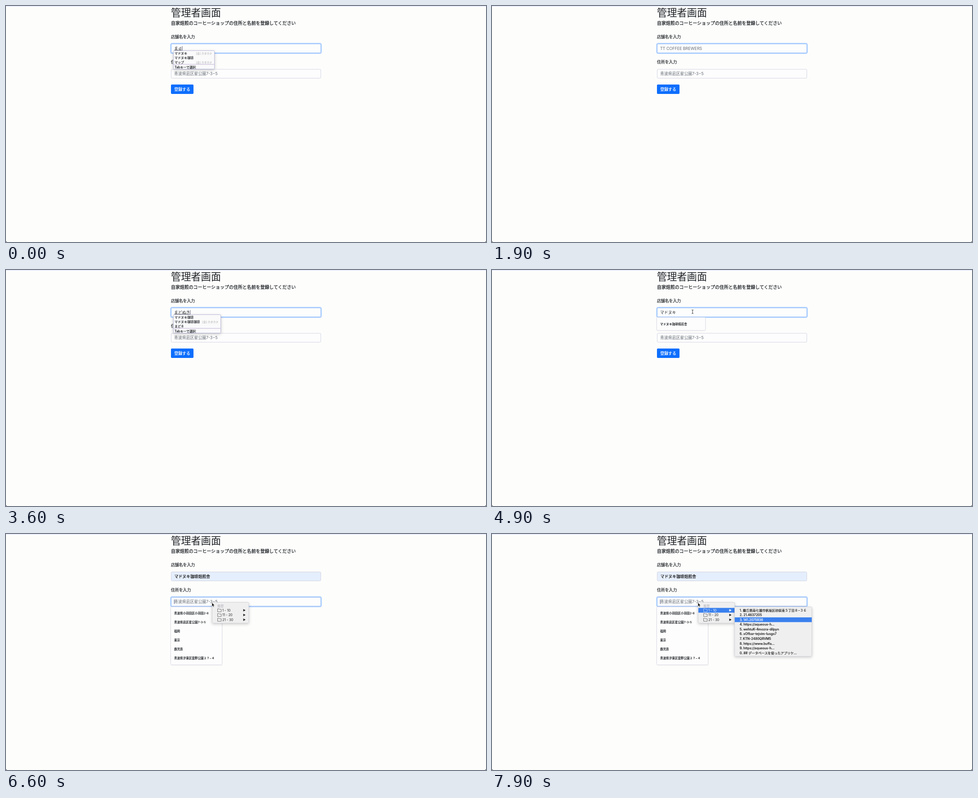
These frames come from a looping animation (1065x526 px, 8 s). An HTML page:

```html
<!DOCTYPE html>
<html lang="ja">
<head>
<meta charset="utf-8">
<title>管理者画面</title>
<style>
  html, body { margin: 0; width: 100%; height: 100%; overflow: hidden; background: #fdfdfc; }
  svg { display: block; width: 100vw; height: 100vh; }
  text { font-family: Inter, "Noto Sans CJK JP", "Noto Sans CJK", sans-serif; white-space: pre; }
  .soft { filter: drop-shadow(0 1px 1px #0001); }
  .deep { filter: drop-shadow(0 2px 3px #0003); }
</style>
</head>
<body>
<svg id="stage" viewBox="0 0 1065 526"></svg>
<script>
const LOOP = 8000, INK = '#212529', MUTED = '#626a73', BLUE = '#0d6efd', PICK = '#3a80ee';
const SHOP = 'マドヌキ', SHOP_FULL = SHOP + '珈琲焙煎舎';
const ADDRESS = '青波県凪区星公園7-3−5';

// Kana shown while composing, with the time each step begins.
const TYPING = [
  [0, 'まｄ'], [700, 'ま'], [1000, ''],
  [2300, 'ｍ'], [2400, 'ま'], [2600, 'まｄ'], [2700, 'まど'], [2900, 'まどｎ'],
  [3000, 'まどぬ'], [3200, 'まどぬｋ'], [3300, 'まどぬき'], [3800, SHOP]
];
const COMMIT = 4200, POINTER = 4600, CHOOSE = 5300, CLICK = 5700, FOCUS = 6000, MENU = 6600;
const HOVERS = [[MENU, -1], [7000, 0], [7500, 1], [7800, 2]];
const POINTER_PATH = [[POINTER, 445, 93], [4950, 445, 93], [5200, 430, 120], [5350, 430, 120], [CLICK, 457, 154]];

const ADDRESS_HISTORY = ['青波県小羽田区小羽田2-6', '青波県凪区星公園7-3-5', '福岡', '東京', '鹿児島', '青波県汐東区雲野公園２７−４'];
const CLIPS = [
  '霧丘県南七瀬市帆坂区砂原東５丁目８−３６', '21.4637205', '141.2075936', 'https://aqueous-h...',
  'wehtuK-4mozra-dilpyn', 'xOfbar-tejvim-lusgo7', 'KTN-2480QRVM5', 'https://www.buffa...',
  'https://aqueous-h...', '## データベースを使ったアプリケ...'
];

const stepAt = (steps, t) => steps.filter(([start]) => start <= t).pop()[1];
const ramp = (t, start, length) => Math.max(0, Math.min(1, (t - start) / length));

function pointerAt(t) {
  const next = POINTER_PATH.findIndex(([time]) => time > t);
  if (next < 1) return POINTER_PATH.at(-1).slice(1);
  const [t0, x0, y0] = POINTER_PATH[next - 1], [t1, x1, y1] = POINTER_PATH[next];
  const k = ramp(t, t0, t1 - t0), ease = k * k * (3 - 2 * k);
  return [x0 + (x1 - x0) * ease, y0 + (y1 - y0) * ease];
}

// Text is placed by its left edge and vertical centre; medium weight gets a hairline outline.
function text(x, cy, size, content, fill = INK, weight = 400) {
  const outline = weight === 500 ? `stroke="${fill}" stroke-width="${size * .028}"` : '';
  return `<text x="${x}" y="${cy + size * .38}" font-size="${size}" font-weight="${weight}" fill="${fill}" ${outline}>${content}</text>`;
}
const rect = (x, y, w, h, fill, extra = '') =>
  `<rect x="${x}" y="${y}" width="${w}" height="${h}" fill="${fill}" ${extra}/>`;
const path = (d, stroke, width = 1, fill = 'none') =>
  `<path d="${d}" stroke="${stroke}" stroke-width="${width}" fill="${fill}"/>`;
const panel = (x, y, w, h, fill, stroke, shadow = 'deep') =>
  rect(x + .5, y + .5, w - 1, h - 1, fill, `rx="2" stroke="${stroke}" class="${shadow}"`);

const field = (y, focus, fill = '#fdfdfd') =>
  rect(365.5, y - .5, 334, 22, 'none', `rx="3" stroke="#b9d6ff" stroke-width="2.4" opacity="${focus}"`) +
  rect(366.5, y + .5, 332, 20, fill, 'rx="2" stroke="#d3d5e2"') +
  rect(366.5, y + .5, 332, 20, 'none', `rx="2" stroke="#86b7fe" opacity="${focus}"`);

const caret = (x, cy) => rect(x, cy - 5, .9, 10, '#55557a');

function page() {
  return rect(0, 0, 1065, 526, '#fdfdfc') + rect(0, 0, 1065, 1, '#dce3fb') +
    path('M0 523V526H3Q0 526 0 523M1065 523V526H1062Q1065 526 1065 523', 'none', 0, '#222') +
    text(366, 14.5, 22.2, '管理者画面') +
    text(366, 38, 9.93, '自家焙煎のコーヒーショップの住所と名前を登録してください', INK, 500) +
    text(366, 68.5, 8.87, '店舗名を入力', INK, 500) + text(366, 125, 8.87, '住所を入力', INK, 500) +
    rect(366, 175, 50, 21, BLUE, 'rx="2"') + text(373.3, 185.5, 8.87, '登録する', '#fff', 500);
}

function shopField(t) {
  const value = stepAt(TYPING, t), chosen = t >= CHOOSE;
  let out = field(84, 1 - ramp(t, FOCUS, 150), chosen ? '#e5eefc' : undefined);
  if (chosen) return out + text(373.7, 94.5, 8.8, SHOP_FULL, '#111', 500);
  if (!value) {
    out += text(373, 94.5, 8.87, 'TT COFFEE BREWERS', MUTED);
    return t % 1000 < 500 ? out + caret(373, 94.5) : out;
  }
  out += text(373, 94.5, 8.87, value);
  if (t >= COMMIT) return out;
  const end = 373 + value.length * 8.87;
  return out + rect(373.5, 98.3, end - 374, .8, '#555') + caret(end, 94.5);
}

function candidates(t) {
  const value = stepAt(TYPING, t);
  if (!value || t >= 3800) return '';
  const long = value.length > 2, width = long ? 106 : 92;
  const words = long ? [SHOP + '珈琲', SHOP + '珈琲珈琲', 'まど８'] : [SHOP, SHOP + '珈琲', 'マップ'];
  const noted = long ? [1] : [0, 2];
  return panel(371, 99, width, 42, '#fafafb', '#b9b9d8') +
    words.map((word, i) => text(374, 105.3 + i * 10, 7.05, word, INK, 500)).join('') +
    noted.map(i => text(371 + width - 41.5, 105.3 + i * 10, 6, '[全] カタカナ', '#a2a2a2')).join('') +
    rect(372, 129.6, width - 2, .9, '#b7a5cc') + text(374, 136.2, 7.05, 'Tabキーで選択', INK, 500);
}

function shopSuggestion(t) {
  if (t < COMMIT || t >= CHOOSE) return '';
  const hover = t > 5100 ? rect(366, 110, 107, 20, '#ececee') : '';
  return panel(365, 105, 109, 30, '#fdfdfd', '#dcdce8', 'soft') + hover +
    text(373, 120.3, 6.65, SHOP_FULL, INK, 600);
}

function addressField(t) {
  const out = field(140.5, ramp(t, FOCUS, 150)) + text(373, 151, 8.87, ADDRESS, MUTED);
  return t < CLICK ? out : out + caret(372.8, 151);
}

function addressHistory(t) {
  if (t < CLICK + 100) return '';
  return panel(365, 162, 115, 130, '#fdfdfd', '#dcdce8', 'soft') +
    ADDRESS_HISTORY.map((item, i) => text(373, 177 + i * 20, 6.55, item, INK, 600)).join('');
}

function clipboardMenu(t) {
  if (t < MENU) return '';
  const hover = stepAt(HOVERS, t), rowY = i => 170 + i * 10.55;
  const highlight = (x, w, i) => rect(x, rowY(i) - 5.3, w, 10.6, PICK);
  let out = panel(457, 152, 82, 47, '#efeff0', '#d6d6dc') + text(469, 160, 7, '履歴', '#b0b0bb');
  if (hover >= 0) out += highlight(458, 80, 0);
  ['1 - 10', '11 - 20', '21 - 30'].forEach((label, i) => {
    const y = rowY(i), color = !i && hover >= 0 ? '#fff' : '#222';
    out += path(`M469.5 ${y + 3.4}V${y - 3.2}H472.5L473.5 ${y - 2.2}H477.5V${y + 3.4}Z`, color, .6) +
      text(480, y, 7.3, label, color) +
      path(`M526.5 ${y - 2.8}L531.5 ${y}L526.5 ${y + 2.8}Z`, 'none', 0, color);
  });
  if (hover < 0) return out;
  out += panel(538, 162, 172, 111, '#efeff0', '#d6d6dc') + highlight(538.5, 171, hover);
  return out + CLIPS.map((clip, i) =>
    text(549.5, rowY(i), 7.2, `${(i + 1) % 10}. ${clip}`, i === hover ? '#fff' : '#222', 500)).join('');
}

function pointer(t) {
  if (t < POINTER) return '';
  const [x, y] = pointerAt(t);
  const arrow = t >= MENU || (t > 5100 && t < 5500);
  const shape = arrow
    ? path('M0 -1V7.5L1.9 5.8L3.2 8.8L4.6 8.2L3.3 5.3H5.8Z', '#fff', .5, '#111')
    : path('M-2 -4.2Q0 -4.2 0 -3Q0 -4.2 2 -4.2M0 -3V3M-2 4.2Q0 4.2 0 3Q0 4.2 2 4.2', '#222', .9);
  const clicking = (t >= CHOOSE - 100 && t < CHOOSE + 100) || (t >= CLICK && t < CLICK + 350);
  const ring = clicking ? '<circle r="8.6" fill="none" stroke="#111" stroke-width="2"/>' : '';
  return `<g transform="translate(${x} ${y})">${shape}${ring}</g>`;
}

const LAYERS = [page, shopField, addressField, candidates, shopSuggestion, addressHistory, clipboardMenu, pointer];
const stage = document.getElementById('stage');
let shown = '';

function draw() {
  const t = performance.now() % LOOP;
  const scene = LAYERS.map(layer => layer(t)).join('');
  if (scene !== shown) stage.innerHTML = shown = scene;
  requestAnimationFrame(draw);
}
draw();
</script>
</body>
</html>
```
